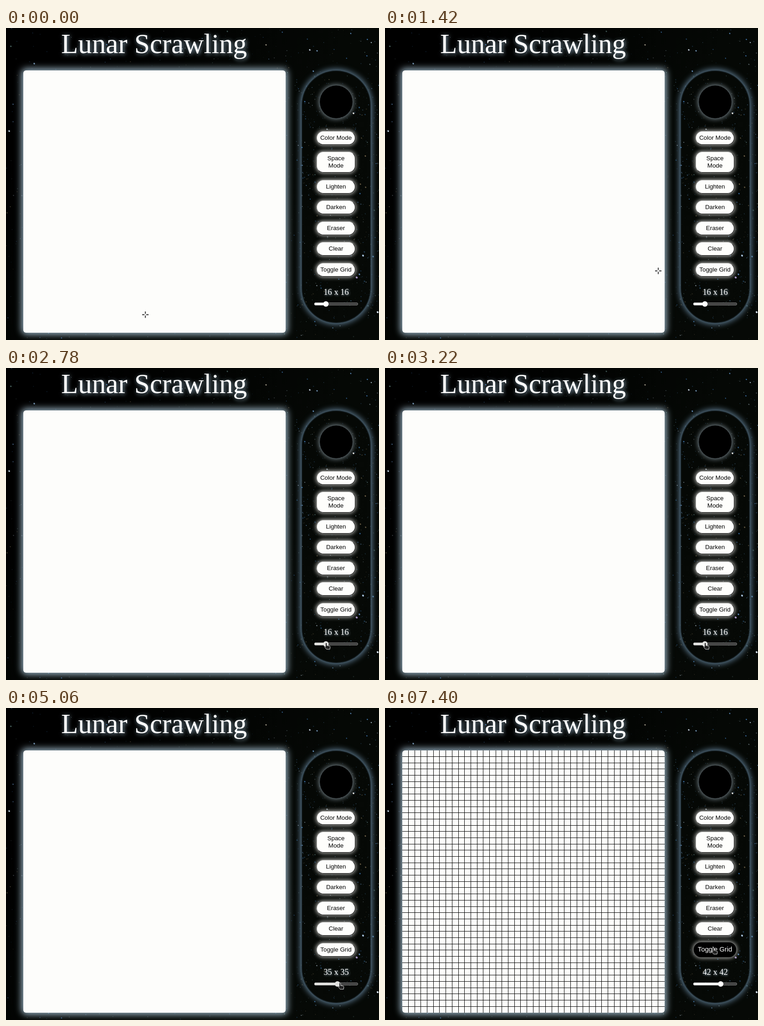
Write an HTML page with a canvas that moves like this. It is 819 by 684 pixels and loops after 8000 ms.

```html
<!DOCTYPE html>
<html lang="en">
<head>
<meta charset="utf-8">
<title>Lunar Scrawling</title>
<style>
html, body { margin: 0; width: 100%; height: 100%; overflow: hidden; background: #000; }
#stage {
  position: absolute; left: 0; top: 0; width: 819px; height: 684px; overflow: hidden;
  background: linear-gradient(125deg, #000 15%, #050805 60%, #060906);
}
#stage > * { position: absolute; box-sizing: border-box; }
#sky { left: 0; top: 0; }
h1 {
  left: 25px; top: 0; width: 600px; margin: 0; text-align: center; white-space: nowrap;
  font: 400 61px/70px "Liberation Serif", Times, serif; color: #fff;
  text-shadow: 2px 2px 10px #8ba5b6;
}
#board {
  left: 38px; top: 93px; width: 575.5px; height: 575px; border-radius: 6px; overflow: hidden;
  background: #fdfdfb; box-shadow: 0 0 15px 4px #9bb4c4;
}
#grid { display: block; }
#panel {
  left: 649px; top: 93px; width: 152px; height: 554px; border-radius: 76px;
  box-shadow: 0 0 14px 2px #6a8aa3, inset 0 0 3px #4c667b;
}
#swatch {
  left: 689px; top: 126px; width: 72px; height: 72px; border-radius: 50%;
  background: #000; box-shadow: 0 0 12px 1px #87959d;
}
.btn {
  left: 682px; width: 85px; display: flex; align-items: center; justify-content: center;
  border: 1px solid; border-color: #a8a8a6 #111 #111 #a8a8a6; border-radius: 15px;
  background: #fefefc; color: #000; text-align: center; white-space: pre;
  font: 13.4px/16px "Liberation Sans", Arial, sans-serif;
  box-shadow: 0 0 8px 2px #a3a3a0;
}
#size {
  left: 665px; top: 569px; width: 120px; text-align: center; color: #fff;
  font: 18.4px/20px "Liberation Serif", Times, serif;
  text-shadow: 1px 1px 5px #8ba5b6;
}
#track {
  left: 677px; top: 602px; width: 96px; height: 6px; border-radius: 3px;
  background: #3b3b3b; border: 1px solid #858585;
}
#fill { left: 677px; top: 602px; height: 6px; border-radius: 3px; }
#thumb { top: 599px; left: -6px; width: 12px; height: 12px; border-radius: 50%; }
#pointer { left: 0; top: 0; overflow: visible; width: 1px; height: 1px; }
</style>
</head>
<body>
<div id="stage">
  <canvas id="sky" width="819" height="684"></canvas>
  <h1>Lunar Scrawling</h1>
  <div id="board"><canvas id="grid" width="576" height="575"></canvas></div>
  <div id="panel"></div>
  <div id="swatch"></div>
  <div id="size"></div>
  <div id="track"></div>
  <div id="fill"></div>
  <div id="thumb"></div>
</div>
<script>
const LOOP = 8000;
const $ = id => document.getElementById(id);
const stage = $('stage');

// Starfield
let seed = 4127;
function rnd() {
  seed = (seed + 0x6D2B79F5) | 0;
  let r = Math.imul(seed ^ (seed >>> 15), 1 | seed);
  r = (r + Math.imul(r ^ (r >>> 7), 61 | r)) ^ r;
  return ((r ^ (r >>> 14)) >>> 0) / 4294967296;
}
const sky = $('sky').getContext('2d');
function star(x, y, r, color, alpha) {
  sky.globalAlpha = alpha;
  sky.fillStyle = color;
  sky.beginPath();
  sky.ellipse(x, y, r, r * 0.85, 0.7, 0, 7);
  sky.fill();
}
const tints = ['#4f93d8', '#3f78b4', '#b8cbd8', '#8c7b5c', '#5b7d78', '#6f9fd0'];
function scatter(count, left, top, width, height) {
  for (let i = 0; i < count; i++) {
    const color = tints[Math.floor(rnd() * tints.length)];
    star(left + rnd() * width, top + rnd() * height, 0.65 + rnd() ** 4 * 1.1, color, 0.2 + rnd() ** 2 * 0.75);
  }
}
scatter(1100, 0, 0, 819, 684);
scatter(420, 640, 120, 180, 500);
const bright = [
  [763, 187, 2, '#fff'], [7, 226, 2, '#cfe4f5'], [667, 48, 1.8, '#dbe9f5'], [683, 50, 1.6, '#8fb8e0'],
  [784, 499, 2.2, '#b5d3f0'], [816, 623, 2.2, '#e8f3ff'], [770, 547, 2.4, '#bba6dc'],
  [776, 540, 1.8, '#6d9ad0'], [62, 78, 1.8, '#7fa3c4'], [571, 37, 1.4, '#d8d0b8'],
  [757, 12, 1.5, '#5f8fbd'], [806, 501, 1.8, '#5f8fbd'], [705, 222, 1.5, '#dbe9f5']
];
for (const [x, y, r, c] of bright) star(x, y, r, c, 0.9);

// Drawing grid, 42 cells a side
const CELLS = 42, SIDE = 575;
const grid = $('grid').getContext('2d');
for (let i = 1; i < CELLS; i++) {
  const p = Math.floor(i * SIDE / CELLS - 0.2);
  grid.fillRect(p, 0, 1, SIDE);
  grid.fillRect(0, p, SIDE + 1, 1);
}

// Buttons
const labels = [
  ['Color Mode', 226], ['Space\nMode', 271, 46], ['Lighten', 333], ['Darken', 378],
  ['Eraser', 424], ['Clear', 469], ['Toggle Grid', 515]
];
let toggle;
for (const [text, top, height = 30] of labels) {
  toggle = document.createElement('div');
  toggle.className = 'btn';
  toggle.textContent = text;
  toggle.style.top = top + 'px';
  toggle.style.height = height + 'px';
  stage.append(toggle);
}
const hover = toggle.animate([
  { background: '#fefefc', color: '#000', borderColor: '#a8a8a6 #111 #111 #a8a8a6', transform: 'scale(1)' },
  { background: '#000', color: '#fff', borderColor: '#000', transform: 'scale(1.1)' }
], { delay: 6300, duration: 800, easing: 'ease', fill: 'both' });
hover.pause();

// Pointer shapes, each with its hot spot at 0,0
stage.insertAdjacentHTML('beforeend', `
<svg id="pointer">
  <g id="cross" fill="none">
    <path d="M-7 0H-2M2 0H7M0-7V-2M0 2V7" stroke="#d8d8d8" stroke-width="3.4"/>
    <path d="M-7 0H-2M2 0H7M0-7V-2M0 2V7" stroke="#111" stroke-width="1.4"/>
  </g>
  <path id="arrow" d="M0 0V12L3 9.4 5 14 7 13 5 8.7H9Z" fill="#111" stroke="#ddd"/>
  <path id="hand" d="M-2.4 0a1.6 1.6 0 0 1 3.2 0V4.4l5.5 1q1.6.5 1.5 2.2l-.7 5h-7.4l-4-5q0-1.7 1.9-.7Z"
    fill="#222" stroke="#ddd"/>
</svg>`);

// [time, x, y]
const path = [
  [0, 306, 628.5], [260, 306, 628.5], [980, 490, 566], [1420, 600, 532.5], [1540, 600, 532.5],
  [1820, 650, 553], [2220, 716.5, 589.5], [2260, 716.5, 589.5], [2660, 704, 604], [3760, 704, 604],
  [4360, 733, 604], [5060, 734, 604], [5160, 734, 604], [5320, 745, 604], [5580, 745, 604],
  [6300, 722, 527], [LOOP, 722, 527]
];
// [time, cells per side]
const sizes = [[0, 16], [3760, 16], [4360, 34], [5059, 34], [5060, 35], [5160, 35], [5320, 42], [LOOP, 42]];

function at(table, t, k) {
  const i = table.findIndex(row => row[0] > t);
  const a = table[i - 1], b = table[i];
  return a[k] + (b[k] - a[k]) * (t - a[0]) / (b[0] - a[0]);
}
const show = (id, on) => { $(id).style.display = on ? '' : 'none'; };

function draw(t) {
  const x = at(path, t, 1), y = at(path, t, 2);
  const onBoard = x < 614;
  const onSlider = t > 2400 && y > 597;
  const onButton = t > 5580 && y < 545;
  $('pointer').style.transform = `translate(${x}px, ${y}px)`;
  show('cross', onBoard);
  show('hand', onSlider || onButton);
  show('arrow', !onBoard && !onSlider && !onButton);

  const n = Math.round(at(sizes, t, 1));
  const pos = 682.4 + (n - 1) * 4 / 3;
  $('size').textContent = `${n} x ${n}`;
  $('fill').style.width = pos - 677 + 'px';
  $('thumb').style.transform = `translateX(${pos}px)`;
  $('fill').style.background = $('thumb').style.background = onSlider ? '#e0e0de' : '#fff';

  hover.currentTime = t;
  show('grid', t >= 7400);
}

const start = performance.now();
function tick() {
  draw((performance.now() - start) % LOOP);
  requestAnimationFrame(tick);
}
tick();
</script>
</body>
</html>
```
